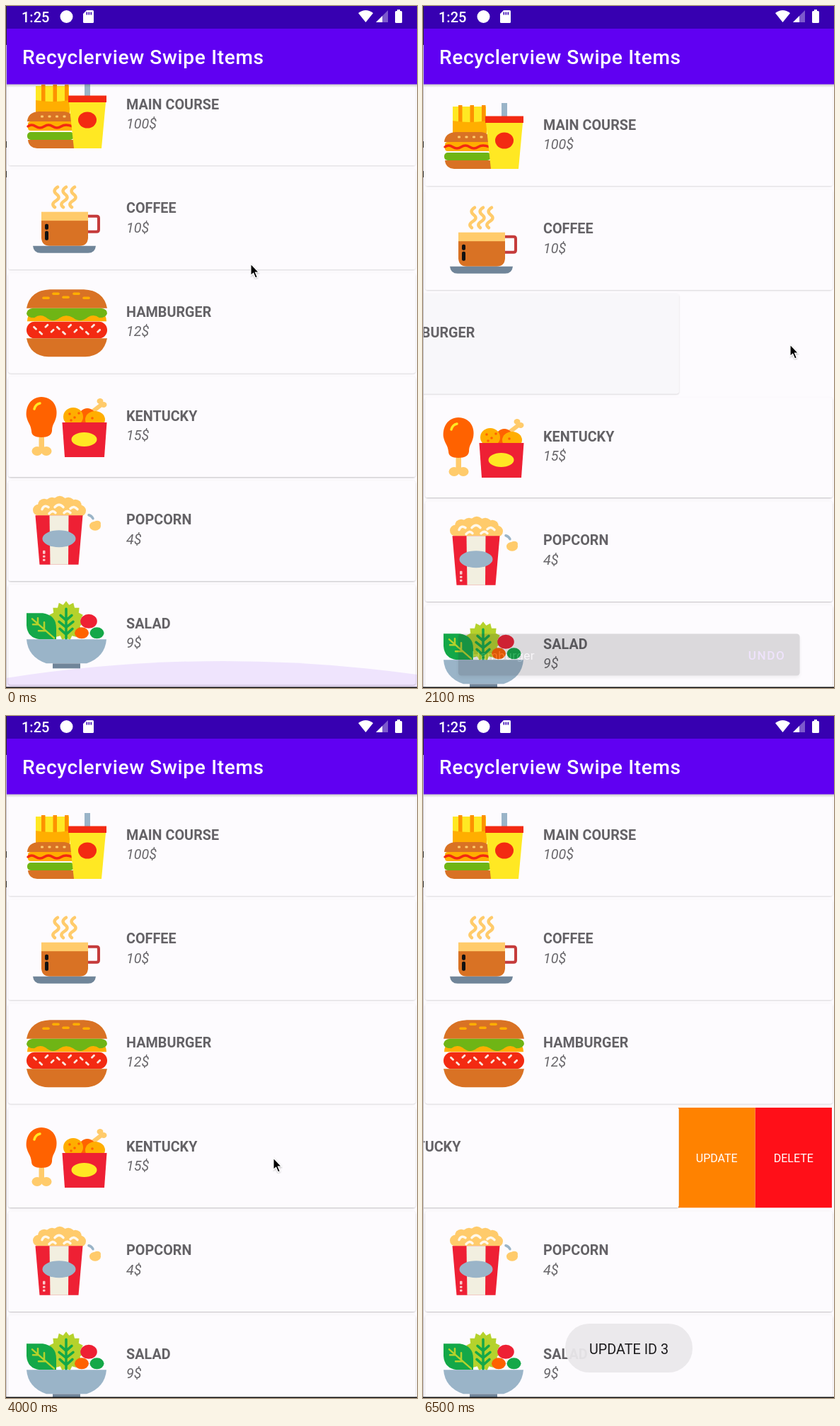
These frames come from a looping animation (581 px wide and 963 px high, 6.6 s). An HTML page:

```html
<!DOCTYPE html>
<html lang="en">
<head>
<meta charset="utf-8">
<title>Swipe list</title>
<style>
  html, body { margin: 0; width: 100%; height: 100%; overflow: hidden; background: #fdfbfe; }
  svg { display: block; width: 581px; height: 963px; font-family: Roboto, sans-serif; }
  .name { font: bold 19.8px Roboto, sans-serif; fill: #646266; }
  .price { font: italic 19.8px Roboto, sans-serif; fill: #6a686c; }
  .action { font-size: 16px; fill: #fff; text-anchor: middle; }
  .bar { font-size: 19.8px; }
  .line { fill: none; stroke-linecap: round; stroke-linejoin: round; }
</style>
</head>
<body>
<svg id="stage" viewBox="0 0 581 963"></svg>
<script>
const LOOP = 6600, STEP = 100, PITCH = 146.67, TOP = 112, OPEN = 217, RIGHT = 578;
const C = {
  bun: '#d97224', cream: '#ffcb6b', amber: '#ffae00', yellow: '#ffe823', red: '#f32a12',
  crimson: '#ee2034', green: '#6fb515', leaf: '#14a848', lime: '#b5d22c', orange: '#ff6200',
  steel: '#9ab4c8', slate: '#708599', paper: '#fdfbfe'
};

const rect = (x, y, w, h, fill, r = 0) =>
  `<rect x="${x}" y="${y}" width="${w}" height="${h}" rx="${r}" fill="${fill}"/>`;
const oval = (x, y, rx, ry, fill) => `<ellipse cx="${x}" cy="${y}" rx="${rx}" ry="${ry}" fill="${fill}"/>`;
const path = (d, fill) => `<path d="${d}" fill="${fill}"/>`;
const line = (d, color, w) => `<path class="line" d="${d}" stroke="${color}" stroke-width="${w}"/>`;
const range = (n, draw) => Array.from({ length: n }, (_, i) => draw(i)).join('');

function star(cx, cy, rx, ry, spikes) {
  const points = range(spikes * 2, i => {
    const a = i * Math.PI / spikes - Math.PI / 2, k = i % 2 ? 0.82 : 1;
    return `${(cx + rx * k * Math.cos(a)).toFixed(1)},${(cy + ry * k * Math.sin(a)).toFixed(1)} `;
  });
  return `<polygon points="${points}" fill="${C.lime}"/>`;
}

const icons = {
  meal: () =>
    rect(42, 30, 47, 24, C.yellow) +
    range(3, i => rect(50 + i * 16.5, 28, 5.5, 24, '#fd9200')) +
    path('M42 50Q66 54 90 50V68H42Z', C.amber) +
    path('M30 80Q31 67 46 66H82Q95 67 96 80Z', C.bun) +
    range(4, i => rect(49 + i * 10.5, 71.5, 4, 3, C.cream, 1)) +
    rect(31, 80, 65, 13, C.amber, 4) +
    line('M31 87Q36 83 42 87T54 87T66 87T78 87T94 87', C.red, 3.5) +
    rect(30, 95, 66, 11, C.green, 5) +
    path('M31 106H97V118H44Q32 117 31 106Z', C.bun) +
    rect(111, 25, 8, 20, C.steel) +
    path('M89 53H141L135 118H96Z', C.yellow) +
    rect(88, 43.5, 54, 9.5, C.red) +
    oval(115, 78, 13, 11.5, C.red),
  coffee: () =>
    range(3, i => line(`M${73 + i * 12} 26q-8 5 -1.500 10t-1 9.500t-1.500 9`, C.cream, 4.5)) +
    line('M116 67H128Q131 67 131 70V86Q131 89 128 89H116', '#c53b3b', 4) +
    path('M50 73H116V98Q115 109 104 109H62Q51 109 50 98Z', C.bun) +
    rect(50, 61, 66, 12.5, C.cream) +
    rect(55, 78, 5, 8, '#111', 2) + rect(55, 88, 5, 13, '#111', 2) +
    path('M38 109H127Q126 119 116 119H49Q39 119 38 109Z', C.slate),
  burger: () =>
    path('M29 50.5Q34 25 62 24H110Q138 25 143 50.5Z', C.bun) +
    [[53, 36], [67, 30], [81, 35], [96, 30], [110, 36]].map(([x, y]) =>
      line(`M${x} ${y}h7`, C.amber, 3.5)).join('') +
    path('M36 58H136Q142 60 142 69H30Q30 60 36 58Z', C.amber) +
    path('M38 50.5H134Q143 51 143 58Q141 64 132 64Q124 58 116 63Q105 72 95 64Q85 58 76 64Q66 72 56 63Q48 58 40 64Q30 64 29 58Q30 51 38 50.5Z', C.green) +
    rect(29, 69.5, 114, 23.5, C.red, 11.5) +
    range(12, i => line(`M${39.5 + i * 8.2} ${i % 2 ? 84 : 77}l${i % 4 < 2 ? '3 3' : '3 -3'}`, '#fbe8df', 2.8)) +
    path('M29 93H143Q138 118 112 119H60Q34 118 29 93Z', C.bun),
  chicken: () =>
    rect(46.5, 82, 7.5, 22, C.cream) +
    oval(44, 105.5, 7.5, 6.5, C.cream) + oval(57, 105.5, 7.5, 6.5, C.cream) +
    path('M50 29C66 29 74 43 71 57C69 66 65 68 65 77Q64 86 50 86Q36 86 36 77C35 68 31 66 29 57C27 43 35 29 50 29Z', C.orange) +
    line('M40 46Q42 39 48 38', C.yellow, 3.5) +
    line('M119 52L136 39', C.cream, 6) +
    oval(133, 35, 4.5, 4, C.cream) + oval(138, 40, 4.5, 4, C.cream) +
    oval(115, 57, 12, 12, C.orange) + oval(95, 57, 14, 13, C.amber) + oval(126, 61, 14, 12, C.amber) +
    [[90, 53], [97, 58], [103, 52], [92, 62], [122, 59]].map(([x, y]) => oval(x, y, 1.8, 1.8, C.orange)).join('') +
    path('M79.5 65H142.5L139 114H83Z', C.crimson) +
    oval(110.5, 89, 18, 10, C.yellow),
  popcorn: () =>
    [[46, 42, 8], [54, 35, 9], [65, 33, 9], [76, 31, 9], [88, 33, 9], [98, 36, 9], [105, 43, 8]]
      .map(([x, y, r]) => oval(x, y, r, r, C.cream)).join('') +
    rect(46, 36, 59, 14, C.cream) +
    line('M51 41Q54 34 60 38M69 38Q75 31 81 38M91 40Q96 35 101 41M61 47Q66 41 70 46M82 46Q87 41 91 46', '#fff8ea', 3.5) +
    path('M41.5 49.5H108.5L102.5 119H47.5Z', C.crimson) +
    path('M61.5 49.5H88.5L88 119H62.5Z', '#f2efe0') +
    oval(75, 82.5, 23.5, 12, C.steel) +
    rect(52, 99, 3.5, 5, '#f9c9c9', 1) + rect(52, 106, 3.5, 3, '#f9c9c9', 1) + rect(52, 111, 3.5, 3, '#f9c9c9', 1) +
    line('M117 49Q121 50 123 54', C.steel, 3.5) +
    oval(126, 64.5, 8, 6.5, C.cream) + oval(129, 61, 5, 4, C.cream),
  salad: () =>
    star(85, 52, 25, 28, 15) +
    line('M85 35V78M85 51L77 44M85 51L93 44M85 61L75 53M85 61L95 53M85 71L76 63M85 71L94 63', C.leaf, 3.5) +
    path('M29 41H52Q71 44 71 62V78H48Q30 76 29 58Z', C.leaf) +
    line('M37 49L68 76M45 56V48M54 64V54M46 57H38M56 66H46', C.lime, 2.5) +
    oval(117, 52.5, 11.8, 10, C.crimson) + oval(107, 69, 10, 8, C.orange) + oval(128.5, 69, 10, 8, C.leaf) +
    path('M29 78H142Q140 103 114 112H57Q31 103 29 78Z', C.steel) +
    rect(66, 112, 39, 7, C.slate)
};

const menu = [
  ['meal', 'MAIN COURSE', '100$'], ['coffee', 'COFFEE', '10$'], ['burger', 'HAMBURGER', '12$'],
  ['chicken', 'KENTUCKY', '15$'], ['popcorn', 'POPCORN', '4$'], ['salad', 'SALAD', '9$']
];

const rowMarkup = ([icon, name, price]) => `
  <g id="${icon}">
    <g class="actions">
      ${rect(0, 1, 0, 141.3, '#ff0f18')}<text class="action" y="77.5">DELETE</text>
      ${rect(0, 1, 0, 141.3, '#ff8200')}<text class="action" y="77.5">UPDATE</text>
    </g>
    <g class="front">
      <g class="shadow" filter="url(#lift)">${rect(3.5, 0.8, 575, 141.2, C.paper, 3)}</g>
      <rect class="card" x="3.5" y="0.8" width="575" height="141.2" rx="3"/>
      ${icons[icon]()}
      <text class="name" x="170" y="62.5">${name}</text>
      <text class="price" x="170" y="90">${price}</text>
    </g>
  </g>`;

const statusIcons =
  oval(85.5, 15, 9, 9, '#fff') +
  path('M114 6H122.5Q124 6 124 7.5V22.5Q124 24 122.5 24H110.5Q109 24 109 22.5V11Z', '#fff') +
  range(3, i => rect(113.5 + i * 3, 8.5, 1.6, 4, '#3700b3')) +
  path('M498 10Q508.5 2 519 10L508.5 23Z', '#fff') +
  '<path d="M540 6V23H523Z" fill="#fff" opacity=".35"/>' +
  path('M532 14V23H523Z', '#fff') +
  rect(550, 7, 10, 17, '#fff', 1.5) + rect(553, 5, 4, 3, '#fff');

const windowEdge =
  rect(0, 0, 1, 55, '#2a2730') + rect(0, 55, 1, 907, '#c4c1c9') +
  rect(0, 191, 1, 9, '#333') + rect(0, 233, 1, 9, '#333') +
  rect(0, 961.5, 581, 1.5, '#111');

const stage = document.getElementById('stage');
stage.innerHTML = `
  <defs>
    <filter id="lift" x="-5%" y="-10%" width="110%" height="120%">
      <feDropShadow dx="0" dy="0.9" stdDeviation="0.9" flood-opacity=".3"/>
    </filter>
    <filter id="float" x="-5%" y="-30%" width="110%" height="170%">
      <feDropShadow dx="0" dy="3" stdDeviation="3" flood-opacity=".35"/>
    </filter>
    <linearGradient id="shade" x2="0" y2="1">
      <stop stop-color="#000" stop-opacity=".22"/><stop offset="1" stop-color="#000" stop-opacity="0"/>
    </linearGradient>
  </defs>
  ${rect(0, 0, 581, 963, C.paper)}
  <g id="list">${menu.map(rowMarkup).join('')}</g>
  <path id="glow" d="M0 949Q290 903.5 581 944V963H0Z" fill="#6200ee"/>
  ${rect(0, 110, 581, 5, 'url(#shade)')}
  ${rect(0, 32, 581, 78.5, '#6000f2')}${rect(0, 0, 581, 32, '#3700b1')}
  <text x="22" y="22.5" font-size="20" font-weight="500" fill="#fff">1:25</text>
  ${statusIcons}
  <text x="23" y="82" font-size="28.2" font-weight="500" letter-spacing=".6" fill="#fff">Recyclerview Swipe Items</text>
  <g id="snackbar" class="bar">
    <rect x="12.5" y="882" width="557.5" height="68" rx="5" fill="#2c2a2d" filter="url(#float)"/>
    <text x="34" y="924" letter-spacing=".5" fill="#dedcdf">Hamburger</text>
    <text x="486" y="924" letter-spacing="1.76" font-weight="500" fill="#a869f5">UNDO</text>
  </g>
  <g id="toast" class="bar">
    <rect x="201" y="858" width="180" height="69" rx="34" fill="#eae8eb" opacity=".94"/>
    <text x="291" y="901" text-anchor="middle" fill="#1c1b1d">UPDATE ID 3</text>
  </g>
  ${windowEdge}
  <path id="cursor" d="M0 0V16.5L3.7 13.2 6.6 20 9.4 18.8 6.5 12.2H11.5Z"
    fill="#000" stroke="#fff" stroke-width="1.2" filter="url(#lift)"/>`;

const byId = id => document.getElementById(id);
const rows = menu.map(([icon]) => {
  const node = byId(icon), part = name => node.querySelector('.' + name);
  return {
    icon, node, front: part('front'), card: part('card'), shadow: part('shadow'), actions: part('actions'),
    blocks: node.querySelectorAll('.actions rect'), labels: node.querySelectorAll('.actions text')
  };
});
const [glow, snackbar, toast, cursor] = ['glow', 'snackbar', 'toast', 'cursor'].map(byId);

// Each key is [time, value, ...]; segments are eased in and out.
function tween(t, keys, axis = 1) {
  const next = keys.findIndex(key => key[0] > t);
  if (next === 0) return keys[0][axis];
  if (next < 0) return keys[keys.length - 1][axis];
  const a = keys[next - 1], b = keys[next];
  const p = (t - a[0]) / (b[0] - a[0]);
  return a[axis] + (b[axis] - a[axis]) * p * p * (3 - 2 * p);
}

const motion = {
  scroll: [[300, -29], [700, 0]],
  glow: [[0, 0.09], [400, 0]],
  burger: [[1000, 0], [1300, 29.4], [1500, OPEN], [2200, OPEN], [2201, 0]],
  chicken: [[4000, 0], [4200, OPEN]],
  burgerFade: [[2100, 1], [2200, 0], [3100, 0], [3300, 1]],
  gap: [[2200, PITCH], [2450, 0], [2950, 0], [3200, PITCH]],
  snackFade: [[2050, 0], [2100, 0.155], [2200, 1], [2900, 1], [3000, 0]],
  snackScale: [[2050, 0.8], [2100, 0.866], [2250, 1]],
  toast: [[4950, 0], [5150, 1]],
  cursor: [[300, 346, 364], [700, 346, 393], [1000, 256, 412], [1300, 227, 412], [1500, 60, 424],
    [2000, 519, 478], [2100, 519, 478], [2500, 509, 771], [2800, 517, 912], [3000, 517, 912],
    [4000, 378, 624], [4200, 160, 630], [4800, 437, 639], [5600, 437, 639], [6100, 595, 690]]
};

function setSwipe(row, shift) {
  row.front.setAttribute('transform', `translate(${-shift})`);
  row.actions.style.display = shift > 0 ? '' : 'none';
  const half = shift / 2;
  row.blocks.forEach((block, i) => {
    const x = RIGHT - half * (i + 1);
    block.setAttribute('x', x);
    block.setAttribute('width', half);
    row.labels[i].setAttribute('x', x + half / 2);
  });
}

function render(t) {
  const at = (name, axis) => tween(t, motion[name], axis);
  const collapse = PITCH - at('gap');
  rows.forEach((row, i) => {
    const y = TOP + i * PITCH + at('scroll') - (i > 2 ? collapse : 0);
    row.node.setAttribute('transform', `translate(0 ${y})`);
    // Shadows deepen towards the bottom of the screen.
    row.shadow.style.opacity = Math.min(1, 0.4 + y / 1200);
    row.card.setAttribute('fill', C.paper);
    setSwipe(row, motion[row.icon] ? at(row.icon) : 0);
  });

  const burger = rows[2], removing = t >= 2100 && t < 2200;
  burger.node.style.opacity = at('burgerFade');
  if (removing) {
    burger.card.setAttribute('fill', '#f8f7fa');
    burger.actions.style.display = 'none';
  }

  glow.style.opacity = at('glow');
  toast.style.opacity = at('toast');
  snackbar.style.opacity = at('snackFade');
  snackbar.setAttribute('transform', `translate(291 916) scale(${at('snackScale')}) translate(-291 -916)`);
  cursor.setAttribute('transform', `translate(${at('cursor', 1)} ${at('cursor', 2)})`);
}

const start = performance.now();
function frame() {
  const t = (performance.now() - start) % LOOP;
  render(Math.floor(t / STEP) * STEP);
  requestAnimationFrame(frame);
}
frame();
</script>
</body>
</html>
```
